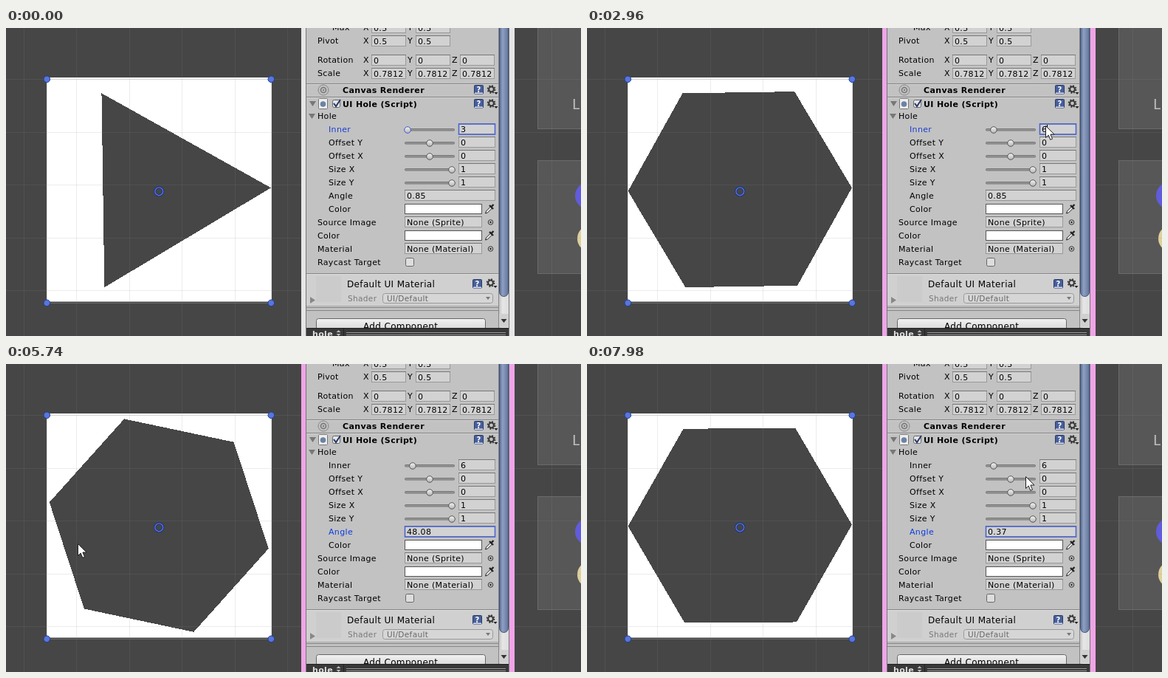
An HTML page for the animation above (8000 ms loop, 779 px wide and 417 px high).

```html
<!DOCTYPE html>
<html lang="en">
<head>
<meta charset="utf-8">
<title>Polygon hole inspector</title>
<style>
html, body { margin: 0; width: 779px; height: 417px; overflow: hidden; background: #464646; }
svg { display: block; }
text { font: 11px "DejaVu Sans", sans-serif; letter-spacing: .35px; white-space: pre; }
.b { font-weight: bold; }
.m { font-size: 12px; }
.s { font-size: 10.5px; }
</style>
</head>
<body>
<svg id="stage" width="779" height="417" viewBox="0 0 779 417"></svg>
<script>
const LOOP = 8000, TICK = 10, WRAP = 1929, DRAG_X = 452;
const CX = 207.25, CY = 218.6, R = 151.7;

const rect = (x, y, w, h, fill, more = '') =>
  `<rect x="${x}" y="${y}" width="${w}" height="${h}" fill="${fill}" ${more}/>`;
const text = (x, y, s, more = '') => `<text x="${x}" y="${y}" ${more}>${s}</text>`;
const circle = (x, y, r, fill, more = '') =>
  `<circle cx="${x}" cy="${y}" r="${r}" fill="${fill}" ${more}/>`;
const path = (d, fill, more = '') => `<path d="${d}" fill="${fill}" ${more}/>`;
const hline = (y, color, x = 407, w = 260) => rect(x, y, w, 1, color);

const field = (x, y, w, s, id = '') =>
  rect(x + .5, y + .5, w - 1, 14, '#d2d2d2', 'stroke="#999"') +
  hline(y, '#777', x, w) + text(x + 3, y + 11.5, s, id && `id="${id}"`);

function slider(y, x, value, id) {
  return rect(540.5, y - .5, 67, 2.5, '#999', 'rx="1" stroke="#666" stroke-width=".8"') +
    circle(x, y + 1, 4.3, 'url(#knob)', `stroke="#555" ${id ? 'id="knobInner"' : ''}`) +
    field(613, y - 8, 50, value, id);
}

const gear = (x, y) =>
  circle(x, y, 3.4, 'none', 'stroke="#333" stroke-width="2"') +
  circle(x, y, 5, 'none', 'stroke="#333" stroke-width="1.6" stroke-dasharray="2 1.93"') +
  path(`M${x + 4} ${y + 4}h5l-2.5 3z`, '#222');

const help = (x, y) =>
  rect(x + .5, y + .5, 12, 11.5, '#475f9c', 'rx="1" stroke="#293a66"') +
  rect(x + 1, y + 10.5, 11, 1.5, '#dde') +
  text(x + 3.5, y + 9.5, '?', 'class="b" fill="#fff" style="font-size:10px"');

const pipette = y =>
  path(`M649.5 ${y + 6}l1-3 6-6 2 2-6 6z`, '#eee', 'stroke="#222"') +
  path(`M655 ${y - 5}l5 5M657.5 ${y - 3}l3-3`, 'none', 'stroke="#222" stroke-width="2.4"');

const swatch = y => rect(540.5, y - 6.5, 104, 13, '#fff', 'stroke="#555"') + pipette(y);

const picker = y => circle(656.5, y, 3.3, 'none', 'stroke="#333"') + circle(656.5, y, 1.2, '#222');
const foldout = (x, y) => path(`M${x} ${y}h9l-4.5 7z`, '#777');

function scene() {
  let s = `<defs>
    <linearGradient id="knob" x2="0" y2="1"><stop stop-color="#f4f4f4"/><stop offset="1" stop-color="#b4b4b4"/></linearGradient>
    <linearGradient id="button" x2="0" y2="1"><stop stop-color="#f2f2f2"/><stop offset="1" stop-color="#d0d0d0"/></linearGradient>
    <linearGradient id="groove"><stop stop-color="#bbb"/><stop offset=".4" stop-color="#e6e6e6"/><stop offset="1" stop-color="#ddd"/></linearGradient>
    <linearGradient id="thumb"><stop stop-color="#56698f"/><stop offset=".35" stop-color="#8fa0c2"/><stop offset="1" stop-color="#62759b"/></linearGradient>
    <clipPath id="panel"><rect x="400" width="289" height="417"/></clipPath></defs>`;
  // Scene view
  s += rect(0, 0, 779, 417, '#464646');
  s += rect(720.5, -5, 70, 141.5, '#575757', 'stroke="#6a6a6a"');
  s += rect(720.5, 179.5, 70, 153, '#575757', 'stroke="#6a6a6a"');
  s += `<text x="767" y="109.5" fill="#bbb" style="font:20px Lato,sans-serif">L</text>`;
  s += circle(789, 227, 18, '#615cdb') + circle(792, 285, 18, '#e0d09c');
  s += rect(55, 67, 305, 303.5, '#fff');
  s += '<polygon id="hole" fill="#464646" shape-rendering="crispEdges"/>';
  for (let i = 0; i < 11; i++) {
    s += rect(Math.floor(24 + 71.5 * i), 0, 1, 417, '#888', 'opacity=".16"');
    if (i < 6) s += rect(0, Math.floor(69.5 + 71.5 * i), 779, 1, '#888', 'opacity=".16"');
  }
  s += rect(55.5, 69.5, 304, 303, 'none', 'stroke="#aaa" opacity=".35"');
  for (const x of [55, 359]) for (const y of [69, 372])
    s += circle(x + .3, y + .3, 4.3, '#5877d6', 'stroke="#22389a"');
  s += circle(207.3, 221.3, 5.4, 'none', 'stroke="#1c2f80" stroke-width="3.2"') +
    circle(207.3, 221.3, 5.4, 'none', 'stroke="#5877d6" stroke-width="1.4"');

  // Inspector window
  s += '<g clip-path="url(#panel)">' + rect(400, 0, 289, 417, '#e6e6e6') +
    rect(400, 0, 289, 417, '#efa5e7', 'id="glow"') +
    rect(406, 0, 276, 417, '#777') + rect(407, 0, 274, 417, '#c2c2c2');
  // Scrollbar
  s += rect(667, 0, 14, 406, 'url(#groove)') + rect(667, 0, 1, 406, '#858585') +
    rect(668.5, -20, 12, 383.5, 'url(#thumb)', 'rx="6" stroke="#40527a"') +
    rect(668, 387, 13, 18, '#d0d0d0') + path('M670.5 394h8l-4 5z', '#333');
  // Transform rows
  s += text(442, 3, 'Max');
  [['Pivot', 10, '0.5'], ['Rotation', 36, '0'], ['Scale', 54, '0.7812']].forEach(([name, y, v], row) => {
    s += text(422, y + 11, name);
    'XYZ'.slice(0, row ? 3 : 2).split('').forEach((axis, i) => {
      s += text(484 + 60 * i, y + 11, axis) + field(495 + 60 * i, y, 47, v);
    });
  });
  s += field(495, -8, 47, '0.5') + field(555, -8, 47, '0.5') + text(484, 3, 'X') + text(544, 3, 'Y');
  // Component headers
  s += hline(75, '#858585') + hline(76, '#d4d4d4') + hline(93, '#858585') + hline(94, '#d4d4d4');
  s += circle(430, 84, 7, 'none', 'stroke="#888"') + circle(430, 84, 3.5, 'none', 'stroke="#777" stroke-width="1.6"') +
    circle(430, 84, 1, '#666');
  s += text(456, 88, 'Canvas Renderer', 'class="b"') + help(634, 77) + gear(657.5, 83);
  s += foldout(411, 99) + rect(423.5, 95.5, 12, 14, '#eee', 'rx="1" stroke="#777"') + circle(429.5, 103, 3.8, '#6b83a3');
  s += rect(442.5, 97.5, 10, 10, '#e4e4e4', 'rx="2" stroke="#666"') +
    path('M444 102l3 4 6-9', 'none', 'stroke="#26376b" stroke-width="2"');
  s += text(456, 107, 'UI Hole (Script)', 'class="b"') + help(634, 96) + gear(657.5, 102);
  // Properties
  s += foldout(410, 116) + text(422, 123, 'Hole');
  ['Inner', 'Offset Y', 'Offset X', 'Size X', 'Size Y', 'Angle', 'Color'].forEach((name, i) => {
    s += text(437, 141 + 18 * i, name, `id="label${i}"`);
  });
  s += slider(137, 544, '3', 'inner') + slider(155, 574, '0') + slider(173, 574, '0') +
    slider(191, 604, '1') + slider(209, 604, '1') + field(540, 219, 123, '0.85', 'angle') + swatch(245);
  s += text(422, 267, 'Source Image') + field(540, 255, 105, 'None (Sprite)') + picker(263);
  s += text(422, 285, 'Color') + swatch(281);
  s += text(422, 303, 'Material') + field(540, 291, 105, 'None (Material)') + picker(299);
  s += text(422, 321, 'Raycast Target') + rect(541.5, 311.5, 11, 11, '#ddd', 'rx="2" stroke="#666"');
  s += rect(613.5, 130, 49, 14, 'none', 'id="focus" stroke="#4c65cf" stroke-width="1.6"') +
    rect(615, 132, 9, 11, '#6f8ee0', 'id="mark" opacity=".55"') + rect(623, 131, 1, 12, '#000', 'id="caret"');
  // Material block
  s += hline(332, '#858585') + rect(407, 333, 260, 43, '#d0d0d0') + hline(333, '#dedede') + hline(376, '#aaa') +
    hline(378, '#858585') + hline(382, '#858585') + rect(420, 336, 34, 35, '#cbcbcb');
  s += text(462, 351, 'Default UI Material', 'class="m"') + help(632, 340) + gear(656.5, 345);
  s += path('M412 364l7 4.5-7 4.5z', '#888') + text(463, 370, 'Shader', 'class="s" fill="#777"') +
    rect(510.5, 359.5, 149, 13, '#d6d6d6', 'rx="3" stroke="#999"') +
    text(516, 369.5, 'UI/Default', 'class="s" fill="#666"') + path('M650 364h6l-3 4z', '#777');
  s += rect(420.5, 393.5, 229, 20, 'url(#button)', 'rx="3" stroke="#666"') + text(484, 408, 'Add Component', 'class="m"');
  // Preview bar
  s += rect(407, 406, 274, 11, '#393939') + hline(406, '#222', 407, 274) + text(415, 417.5, 'hole', 'class="b" fill="#ddd"') +
    path('M447.5 412l3-3 3 3zM447.5 414h6l-3 3z', '#bbb') + rect(457, 407, 1, 10, '#222') +
    hline(412, '#999', 461, 216) + hline(415, '#999', 461, 216) + '</g>';
  // Pointer
  s += '<g id="pointer">' + path('M-3 -3v8l-4 -4z', '#fff', 'id="arrows" stroke="#222"') +
    path('M.5 .5v16l3.7-3.5 2.6 6.3 2.7-1.2-2.6-6.1h5.2z', '#fff', 'stroke="#222"') + '</g>';
  return s;
}

// Pointer track: time, unwrapped x, y
const track = [
  [130, 676, 360], [380, 672, 230], [620, 603, 105], [1190, 603, 105], [1400, 640, 136], [1550, 614, 136],
  [1700, 627, 137], [2410, 627, 137], [2630, 627, 137], [2810, 621, 132], [3100, 621, 132], [3160, 621, 136],
  [3340, 621, 136], [3540, 544, 328], [3700, 544, 335], [4000, 497, 316], [4200, 452, 229], [4400, 452, 229],
  [4940, 534, 226], [5190, 668, 230], [5220, 800, 232], [5450, 1840, 240], [5690, 1900, 243], [5740, 2026.3, 243],
  [6190, 3238, 220], [6230, 3260, 215], [6440, 910, 190], [6520, 620, 180], [6900, 38, 165], [7000, 38, 160],
  [7320, 436, 147], [7359, 436, 147], [7360, 517, 147], [7560, 517, 147], [7680, 663, 176], [7800, 600, 147],
  [7940, 600, 147], [7980, 594, 152]
];

function pointerAt(t) {
  const i = track.findIndex(k => k[0] > t);
  if (i < 0) return track[track.length - 1].slice(1);
  if (!i) return track[0].slice(1);
  const a = track[i - 1], b = track[i], p = (t - a[0]) / (b[0] - a[0]);
  return [a[1] + (b[1] - a[1]) * p, a[2] + (b[2] - a[2]) * p];
}

const $ = id => document.getElementById(id);
const set = (id, attrs) => { for (const k in attrs) $(id).setAttribute(k, attrs[k]); };
const show = (id, on) => set(id, { visibility: on ? 'visible' : 'hidden' });

function draw(t) {
  const [x, y] = pointerAt(t);
  const sides = t < 1750 ? 3 : t < 2300 ? 4 : t < 2960 ? 5 : 6;
  const dragging = t >= 4400;
  const angle = dragging ? .85 + .03 * (pointerAt(Math.min(t, 7320))[0] - DRAG_X) : .85;

  const points = Array.from({ length: sides }, (_, i) => {
    const a = (angle + i * 360 / sides) * Math.PI / 180;
    return (CX + R * Math.cos(a)).toFixed(2) + ',' + (CY - R * Math.sin(a)).toFixed(2);
  });
  set('hole', { points: points.join(' ') });
  $('inner').textContent = sides;
  $('angle').textContent = Math.round(angle * 100) / 100;

  set('knobInner', { cx: 544 + (sides - 3) * 2.3, stroke: t < 1190 ? '#3d5ad0' : '#555' });
  set('label0', { fill: dragging ? '#000' : '#1b3fd0' });
  set('label5', { fill: dragging ? '#0a3be0' : '#000' });
  set('focus', dragging ? { x: 540.5, y: 220, width: 122 } : { x: 613.5, y: 130, width: 49 });
  show('mark', t >= 1450 && t < 1750);
  show('caret', t >= 1750 && !dragging);
  set('glow', { opacity: Math.max(0, Math.min(1, (t - 740) / 260)) });

  set('pointer', { transform: `translate(${Math.round(x % WRAP)} ${Math.round(y)})` });
  show('pointer', t >= 130);
  $('arrows').style.display = t >= 4200 && t < 5000 ? '' : 'none';
}

$('stage').innerHTML = scene();
const start = performance.now();
function frame() {
  const t = (performance.now() - start) % LOOP;
  draw(Math.floor(t / TICK) * TICK);
  requestAnimationFrame(frame);
}
frame();
</script>
</body>
</html>
```
